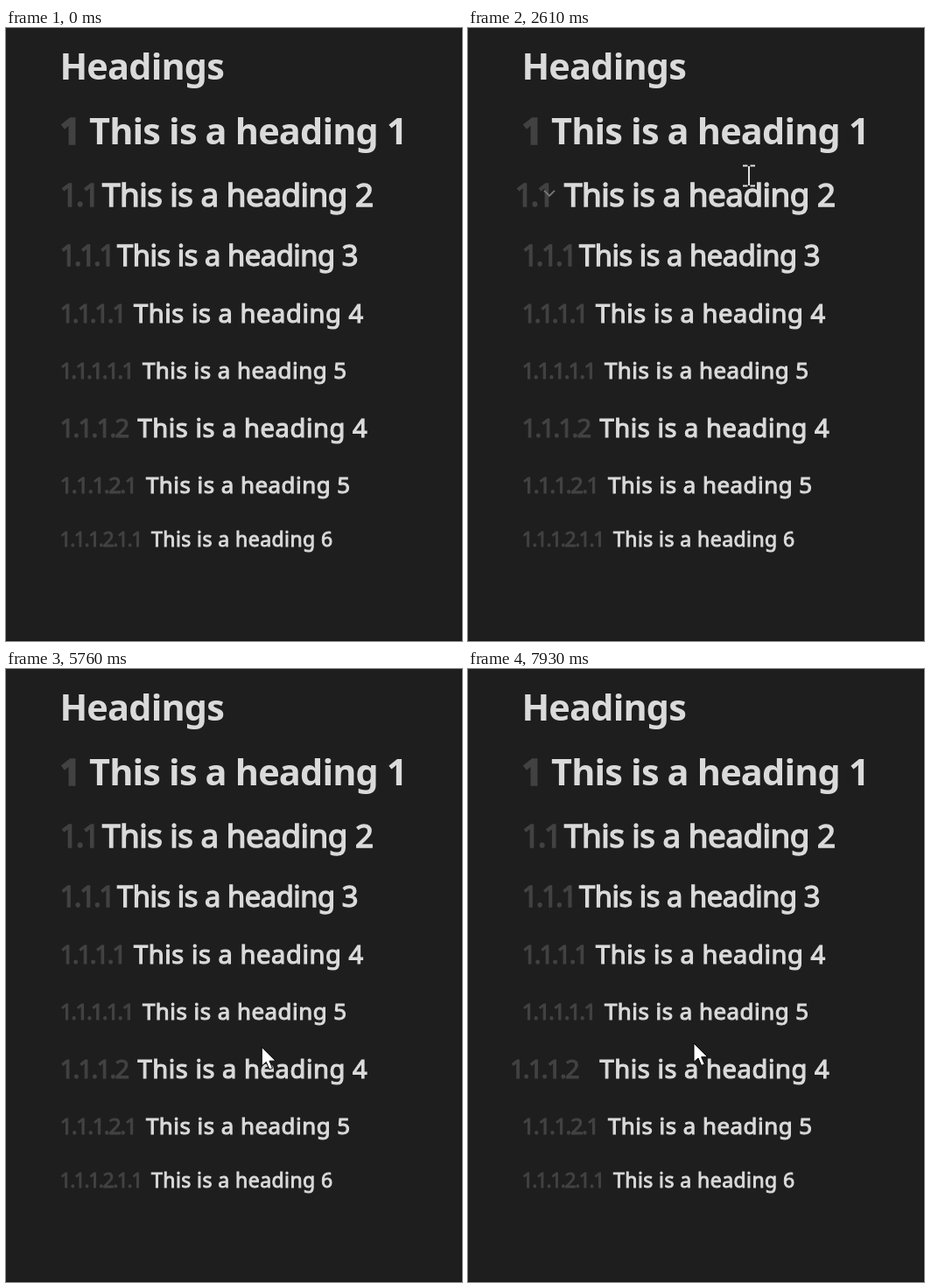
Write an HTML page that moves like this. It is 521 by 701 pixels and loops after 8000 ms.

```html
<!DOCTYPE html>
<html lang="en">
<head>
<meta charset="utf-8">
<title>Numbered headings</title>
<style>
  html, body { margin: 0; width: 100%; height: 100%; overflow: hidden; background: #1e1e1e; }
  svg { display: block; width: 521px; height: 701px; }
  text { font-family: "Noto Sans", "Open Sans", sans-serif; fill: #dadada; stroke: #dadada; stroke-width: 0.04em; }
  .large { letter-spacing: -0.014em; }
  .small { letter-spacing: 0.019em; }
  .bold { font-weight: 700; letter-spacing: -0.02em; stroke: none; }
  .num { fill: #424242; stroke: #424242; }
  .fold { fill: none; stroke: #757575; stroke-width: 2; }
  .beam { fill: none; stroke: #fff; stroke-width: 2; mix-blend-mode: difference; }
  .arrow { fill: #fff; stroke: #000; stroke-width: 1; }
</style>
</head>
<body>
<svg id="stage" viewBox="0 0 521 701">
  <rect width="521" height="701" fill="#1e1e1e"/>
  <path d="M520.5 0V700.5H0" fill="none" stroke="#151515"/>
</svg>
<script>
const LOOP = 8000, START = 80, FADE = 220, SHIFT = -16, NUMBER_X = 61.5;
const stage = document.getElementById('stage');

// number, level, text x, baseline
const rows = [
  ['1', 1, 95, 133],
  ['1.1', 2, 110, 204],
  ['1.1.1', 3, 127, 272],
  ['1.1.1.1', 4, 146, 337],
  ['1.1.1.1.1', 5, 156, 401],
  ['1.1.1.2', 4, 150.5, 468],
  ['1.1.1.2.1', 5, 160, 532],
  ['1.1.1.2.1.1', 6, 166, 593]
];

// pointer path: time, x, y
const path = [
  [START, 275, 6], [840, 443, 56], [1070, 472, 53.5], [1220, 484, 59],
  [1680, 340, 104], [2610, 321, 169], [3600, 315, 246], [4910, 297, 364],
  [6700, 287, 508], [7470, 279, 577], [7600, 279, 577], [7740, 266, 487], [7930, 258, 428]
];

const sizeOf = level => 23 * 1.125 ** (6 - level);
const clamp = k => Math.max(0, Math.min(1, k));

function ease(k) {
  k = clamp(k);
  return k * k * (3 - 2 * k);
}

function add(tag, attrs, content = '') {
  const el = document.createElementNS(stage.namespaceURI, tag);
  for (const key in attrs) el.setAttribute(key, attrs[key]);
  el.textContent = content;
  return stage.appendChild(el);
}

function label(content, x, y, level, extra = '') {
  const style = level === 1 ? 'bold' : level < 4 ? 'large' : 'small';
  return add('text', { x, y, 'font-size': sizeOf(level), class: `${style} ${extra}` }, content);
}

// ones are set tighter than the other digits
function numberLabel(number, y, level) {
  const digits = number.split('.');
  const ones = digits.filter(d => d === '1').length;
  const el = label(number, NUMBER_X, y, level, 'num');
  el.style.letterSpacing = -0.078 * ones / digits.length + 'em';
  return el;
}

function pointer(t) {
  const found = path.findIndex(p => p[0] >= t);
  const i = Math.max(1, found < 0 ? path.length - 1 : found);
  const [t0, x0, y0] = path[i - 1], [t1, x1, y1] = path[i];
  const k = clamp((t - t0) / (t1 - t0));
  return [x0 + (x1 - x0) * k, y0 + (y1 - y0) * k];
}

function zone(baseline, level) {
  const size = sizeOf(level), middle = baseline - 0.36 * size;
  return y => Math.abs(y - middle) < 0.8 * size;
}

// spans of time in which the pointer is over a row
function visits(hit) {
  const spans = [];
  let inside = false;
  for (let t = START; t <= LOOP; t += 2) {
    const over = hit(pointer(t)[1]);
    if (over && !inside) spans.push([t, Infinity]);
    if (!over && inside) spans[spans.length - 1][1] = t;
    inside = over;
  }
  return spans;
}

label('Headings', 61.5, 59, 1);
const inTitle = zone(59, 1);

const headings = rows.map(([num, level, x, y], i) => {
  label('This is a heading ' + level, x, y, level);
  const number = numberLabel(num, y, level);
  const next = rows[i + 1];
  const fold = next && next[1] > level && add('path', {
    class: 'fold', d: `M${x - 23} ${y - 0.41 * sizeOf(level) - 3}l6 6l6 -6`
  });
  const hit = zone(y, level);
  return { number, fold, hit, spans: visits(hit) };
});

const beam = add('path', {
  class: 'beam', d: 'M-7 -11.5H-1.5M1.5 -11.5H7M0 -11V11M-7 11.5H-1.5M1.5 11.5H7'
});
const arrow = add('path', {
  class: 'arrow', d: 'M0 0V21.5L5 17L8.7 25.5L12.3 24L8.7 15.7H15.8Z'
});

function show(el, visible) {
  el.setAttribute('visibility', visible ? 'visible' : 'hidden');
}

function draw(t) {
  const [x, y] = pointer(t);
  const active = t >= START;

  for (const { number, fold, hit, spans } of headings) {
    const shifts = spans.map(([start, end]) =>
      ease((t - start) / FADE) * (1 - ease((t - end) / FADE)));
    number.setAttribute('transform', `translate(${SHIFT * Math.max(0, ...shifts)} 0)`);
    if (fold) show(fold, active && hit(y));
  }

  const overText = inTitle(y) || headings.some(h => h.hit(y));
  show(beam, active && overText);
  show(arrow, active && !overText);
  for (const el of [beam, arrow]) el.setAttribute('transform', `translate(${x} ${y})`);
}

const begin = performance.now();
function loop() {
  draw((performance.now() - begin) % LOOP);
  requestAnimationFrame(loop);
}
loop();
</script>
</body>
</html>
```
